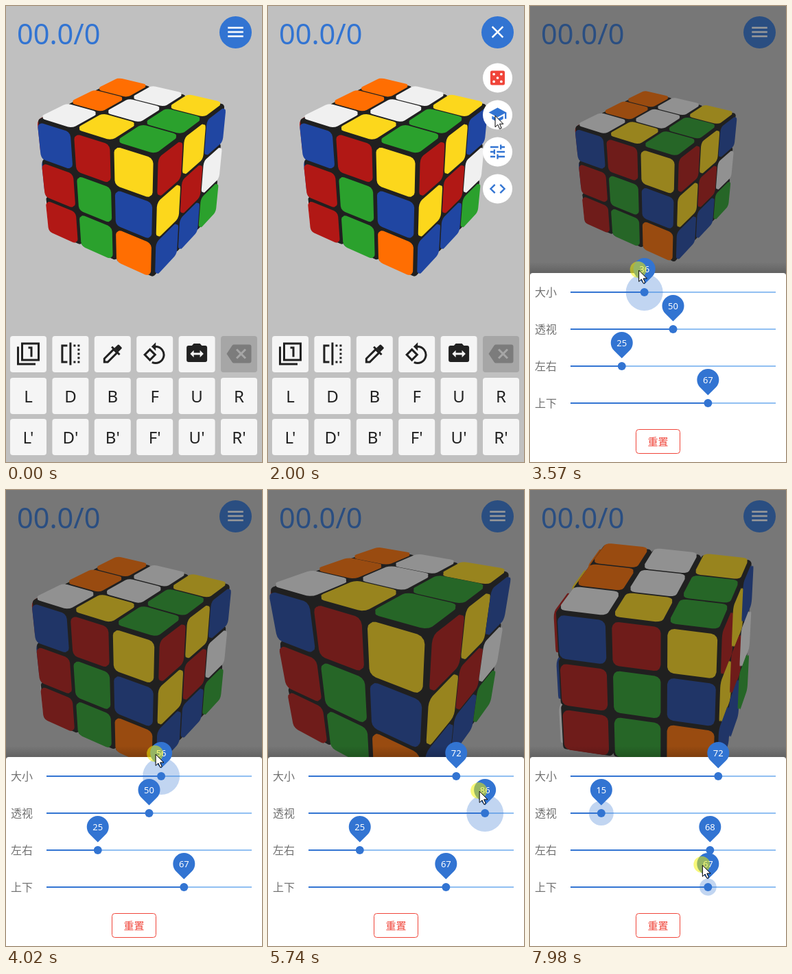
Animation of 373x666 px, one loop 8 s. Source, as an HTML page:

```html
<!DOCTYPE html>
<html lang="zh">
<head>
<meta charset="utf-8">
<title>Cube settings</title>
<style>
html, body { margin: 0; width: 100%; height: 100%; overflow: hidden; background: #c0c0c0; }
svg { display: block; width: 100%; height: 100%; font-family: "Noto Sans", "Open Sans", "Noto Sans CJK SC", "Noto Sans CJK", sans-serif; }
.mid { text-anchor: middle; }
</style>
</head>
<body>
<svg id="stage" viewBox="0 0 373 666"></svg>
<script>
const LOOP = 8000, BLUE = '#3274d2', RED = '#f0453a', INK = '#212121';
const stage = document.getElementById('stage');

function set(node, attrs) {
  for (const key in attrs) node.setAttribute(key, attrs[key]);
}
function el(parent, tag, attrs = {}, text) {
  const node = document.createElementNS('http://www.w3.org/2000/svg', tag);
  set(node, attrs);
  if (text !== undefined) node.textContent = text;
  return parent.appendChild(node);
}

const clamp = x => Math.max(0, Math.min(1, x));
const smooth = x => x * x * (3 - 2 * x);
const ramp = (t, a, b) => smooth(clamp((t - a) / (b - a)));

// Eased value at time t along [time, value, ...] keys.
function track(t, keys, index = 1) {
  return keys.slice(1).reduce((value, key, i) =>
    value + (key[index] - keys[i][index]) * ramp(t, keys[i][0], key[0]), keys[0][index]);
}

// Icons on a 24 unit grid: filled shapes and lines 2 units wide.
const cross = (x, r) => `M${x - r} ${12 - r}l${2 * r} ${2 * r}M${x + r} ${12 - r}l${-2 * r} ${2 * r}`;
const pip = (x, y) => `M${x - 1.6} ${y}a1.6 1.6 0 1 0 3.2 0a1.6 1.6 0 1 0-3.2 0z`;
const ICONS = {
  layers: { line: 'M6 2H22V18H6ZM2 5V22H19M12 6H15V15' },
  flip: { line: 'M9 4H4V20H9M12 1V23M15 4h2M15 20h2' + [4, 8, 12, 16, 20].map(y => `M19 ${y}h2`).join('') },
  picker: {
    fill: 'M10.5 5.9L11.9 4.5L19.5 12.1L18.1 13.5ZM13.8 6.4L17 3.3Q17.7 2.7 18.4 3.3L20.7 5.6Q21.3 6.3 20.7 7L17.6 10.2Z',
    line: 'M4 20V16.7L13.1 7.6L16.4 10.9L7.3 20Z'
  },
  rotate: { fill: 'M13 .8L8.8 5L13 9.2Z', line: 'M2.3 12.9l5-5.1l5.1 5.1l-5.1 5.1ZM12 5H13A8 8 0 1 1 9.4 20.2' },
  camera: {
    fill: 'M9 2L7.2 4H4a2 2 0 0 0-2 2v12a2 2 0 0 0 2 2h16a2 2 0 0 0 2-2V6a2 2 0 0 0-2-2h-3.2L15 2Z' +
      'M5.5 12L9 8.5V11H15V8.5L18.5 12L15 15.5V13H9V15.5Z'
  },
  erase: { fill: 'M24 5a2 2 0 0 0-2-2H7Q6 3 5.4 3.9L0 12L5.4 20.1Q6 21 7 21H22a2 2 0 0 0 2-2Z', line: cross(14, 4.3) },
  menu: { line: 'M3 7H21M3 12H21M3 17H21' },
  close: { line: cross(12, 6.3) },
  dice: {
    fill: 'M5 3H19a2 2 0 0 1 2 2V19a2 2 0 0 1-2 2H5a2 2 0 0 1-2-2V5a2 2 0 0 1 2-2z' + pip(12, 12) +
      [7.4, 16.6].map(x => pip(x, 7.4) + pip(x, 16.6)).join('')
  },
  school: { fill: 'M5 13.2v4L12 21l7-3.8v-4L12 17ZM12 3L1 9L12 15L21 10.1V17H23V9Z' },
  tune: { line: 'M3 6H13M16 3V9M16 6H21M3 12H8M8 9V15M11 12H21M3 18H9M12 15V21M12 18H21' },
  code: { line: 'M8.7 6.7L3.4 12l5.3 5.3M15.3 6.7L20.6 12l-5.3 5.3' }
};
function icon(parent, name, x, y, scale, color, lineColor = color) {
  const g = el(parent, 'g', { transform: `translate(${x} ${y}) scale(${scale}) translate(-12 -12)` });
  const { fill, line } = ICONS[name];
  if (fill) el(g, 'path', { d: fill, fill: color, 'fill-rule': 'evenodd' });
  if (line) el(g, 'path', { d: line, fill: 'none', stroke: lineColor, 'stroke-width': 2 });
}

// Cube with half edge 1; tiles are listed row by row from the top left.
const COLORS = { R: '#b11815', G: '#2ba12d', B: '#2046a2', Y: '#fcd71c', W: '#f0f0f0', O: '#ff6e02' };
const FACES = [
  { tiles: 'OYRGGBRBW', at: (u, v, h) => [-h, v, u], back: true },
  { tiles: 'OWYOWGWYG', at: (u, v, h) => [u, h, -v] },
  { tiles: 'BRYRGBRGO', at: (u, v, h) => [u, v, h] },
  { tiles: 'RYBYRWBBG', at: (u, v, h) => [h, v, -u] }
];
const STEP = 2 / 3, TILE = 0.29, CORNER = 0.075, THICK = 0.028, ROUND = 0.05;

const cube = el(stage, 'g');
const backTiles = el(cube, 'g');
const body = el(cube, 'path', { fill: '#202020', stroke: '#202020', 'stroke-linejoin': 'round' });
const frontTiles = el(cube, 'g');
const tiles = FACES.flatMap(face => [...face.tiles].map((name, i) => ({
  face, u: (i % 3 - 1) * STEP, v: (1 - Math.floor(i / 3)) * STEP,
  node: el(face.back ? backTiles : frontTiles, 'path', { fill: COLORS[name] })
})));

// Rounded square: four points on each corner arc.
const outline = Array.from({ length: 16 }, (_, i) => {
  const q = Math.floor(i / 4), a = (q + (i % 4) / 3) * Math.PI / 2, mid = (q + 0.5) * Math.PI / 2;
  const inner = (TILE - CORNER) * Math.SQRT2;
  return [inner * Math.cos(mid) + CORNER * Math.cos(a), inner * Math.sin(mid) + CORNER * Math.sin(a)];
});

function drawCube(size, depth, yawValue, pitchValue) {
  const k = 373 / 4 * (0.5 + size / 100);
  const dist = 8 * 2 ** ((50 - depth) / 46);
  const yaw = (1 - yawValue / 100) * Math.PI / 4, pitch = pitchValue / 100 * Math.PI / 4;
  const c = Math.cos(yaw), s = Math.sin(yaw), cp = Math.cos(pitch), sp = Math.sin(pitch);
  const point = ([x, y, z]) => {
    const near = x * s + z * c, f = k * dist / (dist - y * sp - near * cp);
    return (186.5 + (x * c - z * s) * f).toFixed(2) + ' ' + (239.2 - (y * cp - near * sp) * f).toFixed(2);
  };
  const poly = points => 'M' + points.map(point).join('L') + 'Z';

  const h = STEP / 2 - ROUND, square = [[-h, -h], [h, -h], [h, h], [-h, h]];
  let d = '';
  for (let n = 0; n < 27; n++) {
    const center = [n % 3, Math.floor(n / 3) % 3, Math.floor(n / 9)].map(i => (i - 1) * STEP);
    for (const face of FACES.slice(1)) {
      d += poly(square.map(([u, v]) => face.at(u, v, h).map((p, i) => p + center[i])));
    }
  }
  set(body, { d, 'stroke-width': 2 * ROUND * k });
  for (const { face, u, v, node } of tiles) {
    set(node, {
      d: [0, 0.5, 1].map(lift =>
        poly(outline.map(([a, b]) => face.at(u + a, v + b, 1 + THICK * lift)))).join('')
    });
  }
}

// Timer and keypad
el(stage, 'text', { x: 16, y: 55.5, 'font-size': 41.5, fill: BLUE }, '00.0/0');
const keyIcons = ['layers', 'flip', 'picker', 'rotate', 'camera', 'erase'];
[...'LDBFUR'].forEach((letter, i) => {
  [keyIcons[i], letter, letter + "'"].forEach((name, row) => {
    const x = 6 + i * 61.4, y = Math.round(482 + row * 60.7), off = name === 'erase';
    el(stage, 'rect', { x, y, width: 53, height: 53, rx: 4, fill: off ? '#a6a6a6' : '#f5f5f5' });
    if (row) el(stage, 'text', { x: x + 26.5, y: y + 35.7, 'font-size': 24, fill: INK, class: 'mid' }, name);
    else icon(stage, name, x + 26.5, y + 26, 1.5, off ? '#7c7c7c' : INK, off ? '#a6a6a6' : INK);
  });
});

// Round menu button with its items
const MENU_X = 334.5;
const items = ['dice', 'school', 'tune', 'code'].map((name, i) => {
  const g = el(stage, 'g');
  el(g, 'circle', { r: 21.5, fill: '#fff' });
  icon(g, name, 0, 0, 1.17, i ? BLUE : RED);
  return g;
});
el(stage, 'circle', { cx: MENU_X, cy: 38.5, r: 23.5, fill: BLUE });
const [menuIcon, closeIcon] = ['menu', 'close'].map(name => {
  const g = el(stage, 'g');
  icon(g, name, MENU_X, 38, 1.25, '#fff');
  return g;
});

// Settings sheet; each slider has the [time, value] keys of its drag.
const SLIDERS = [
  { name: '大小', keys: [[2900, 50], [3560, 36], [3700, 36], [4300, 72]] },
  { name: '透视', keys: [[4900, 50], [5720, 86], [5900, 86], [6660, 15]], focus: 18 },
  { name: '左右', keys: [[7200, 25], [7720, 68]] },
  { name: '上下', keys: [[8060, 67]] }
];
const LEAD = 150, PRESSED = 27;
const rowY = i => 418 + 54 * i;
const thumbX = value => 59 + 2.99 * value;

const shade = el(stage, 'rect', { width: 373, height: 666, fill: INK });
const sheet = el(stage, 'g');
const fade = el(el(stage, 'defs'), 'linearGradient', { id: 'fade', x1: 0, y1: 0, x2: 0, y2: 1 });
el(fade, 'stop', { offset: 0, 'stop-opacity': 0 });
el(fade, 'stop', { offset: 1, 'stop-opacity': 0.2 });
el(sheet, 'rect', { y: 374, width: 373, height: 18, fill: 'url(#fade)' });
el(sheet, 'path', { d: 'M0 666V394a4 4 0 0 1 4-4H369a4 4 0 0 1 4 4V666Z', fill: '#fff' });
SLIDERS.forEach((slider, i) => {
  const { name, keys } = slider;
  const g = el(sheet, 'g', { transform: `translate(0 ${rowY(i)})` });
  el(g, 'text', { x: 7, y: 6, 'font-size': 16, fill: '#707070' }, name);
  el(g, 'rect', { x: 59, y: -1, width: 299, height: 2, fill: '#90bff2' });
  slider.bar = el(g, 'rect', { x: 59, y: -1, height: 2, fill: BLUE });
  slider.thumb = el(g, 'g');
  slider.halo = el(slider.thumb, 'circle', { fill: BLUE, opacity: 0.3 });
  el(slider.thumb, 'circle', { r: 6, fill: BLUE });
  el(slider.thumb, 'path', { d: 'M0-11.4L-11.3-22.7A16 16 0 1 1 11.3-22.7Z', fill: BLUE });
  slider.label = el(slider.thumb, 'text', { y: -29.3, 'font-size': 13, fill: '#fff', class: 'mid' });
  slider.start = keys[0][0];
  slider.end = keys[keys.length - 1][0];
});
el(sheet, 'rect', { x: 154.5, y: 618.5, width: 64, height: 35, rx: 4, fill: 'none', stroke: RED });
el(sheet, 'text', { x: 186.5, y: 641.7, 'font-size': 15, fill: RED, class: 'mid' }, '重置');

// Pointer: menu button, third item, then along with each drag
const pointer = el(stage, 'g');
const press = el(pointer, 'circle', { cx: -1, cy: -1, r: 12, fill: '#f2f200', opacity: 0.52 });
el(pointer, 'path', {
  d: 'M0 0V16.5L3.8 13L6.6 19.2L9.2 18L6.5 12H11.8Z', fill: '#fff', stroke: '#000', 'stroke-linejoin': 'round'
});
const path = [[300, 302, 577], [900, 331, 38], [1600, 331, 38], [2225, 331, 211], [2350, 331, 211]];
const presses = [[1000, 1090], [2240, 2340]];
SLIDERS.forEach(({ keys, start, end }, i) => {
  const stops = [[start - 250, keys[0][1]], ...keys];
  path.push(...stops.map(([time, value]) => [time, thumbX(value) - 8, rowY(i) - 32]));
  presses.push([start - LEAD, end]);
});

function draw(t) {
  const values = SLIDERS.map(({ keys }) => track(t, keys));
  drawCube(...values);

  const open = ramp(t, 1060, 1300) * (1 - ramp(t, 2280, 2480));
  const turn = angle => `rotate(${angle} ${MENU_X} 38.5)`;
  set(menuIcon, { opacity: 1 - open, transform: turn(45 * open) });
  set(closeIcon, { opacity: open, transform: turn(45 * open - 45) });
  items.forEach((g, i) => {
    const shown = ramp(t, 1080 + i * 50, 1300 + i * 50) * (1 - ramp(t, 2280, 2460));
    set(g, { opacity: shown, transform: `translate(${MENU_X} ${105 + i * 54}) scale(${0.4 + 0.6 * shown})` });
  });

  const up = ramp(t, 2320, 2680);
  set(shade, { opacity: 0.46 * up });
  set(sheet, { transform: `translate(0 ${300 * (1 - up)})` });
  SLIDERS.forEach(({ bar, thumb, halo, label, start, end, focus = 0 }, i) => {
    const x = thumbX(values[i]);
    const grow = ramp(t, start - LEAD, start), shrink = ramp(t, end, end + (focus ? 120 : 330));
    set(bar, { width: x - 59 });
    set(thumb, { transform: `translate(${x})` });
    set(halo, { r: PRESSED * grow - (PRESSED - focus) * shrink });
    label.textContent = Math.round(values[i]);
  });

  set(pointer, {
    visibility: t < 300 ? 'hidden' : 'visible',
    transform: `translate(${track(t, path)} ${track(t, path, 2)})`
  });
  set(press, { display: presses.some(([a, b]) => t >= a && t < b) ? 'inline' : 'none' });
}

const start = performance.now();
function tick() {
  draw((performance.now() - start) % LOOP);
  requestAnimationFrame(tick);
}
tick();
</script>
</body>
</html>
```
